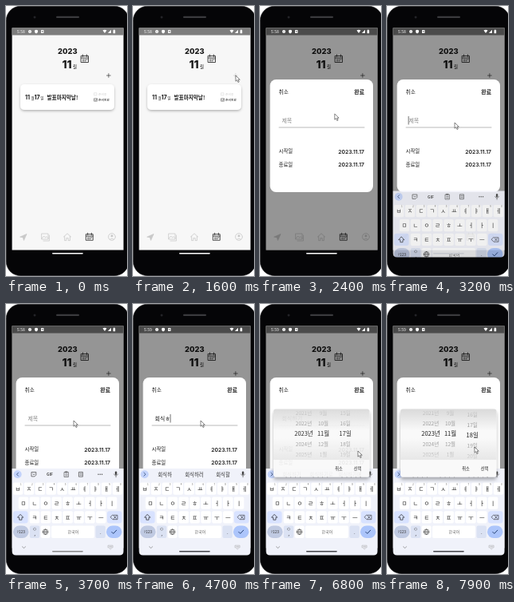
Recreate the animation shown at these times as an HTML page. Size 152 by 338 pixels, loop 8 s.

```html
<!DOCTYPE html>
<html lang="ko">
<head>
<meta charset="utf-8">
<title>Calendar app</title>
<style>
  html, body { margin: 0; width: 100%; height: 100%; overflow: hidden; background: #fff; }
  svg { display: block; width: 100vw; height: 100vh; }
  text { font-family: 'Noto Sans CJK KR', 'Noto Sans CJK', 'Noto Sans', sans-serif; white-space: pre; }
  .num { font-family: Inter, 'Noto Sans CJK KR', sans-serif; }
</style>
</head>
<body>
<svg id="stage" viewBox="0 0 152 338" xmlns="http://www.w3.org/2000/svg"></svg>
<script>
const LOOP = 8000;
const INK = '#191919';

const text = (x, y, size, str, { weight = 400, fill = INK, anchor = 'start', cls = '', id = '' } = {}) =>
  `<text x="${x}" y="${y}" font-size="${size}" font-weight="${weight}" fill="${fill}" text-anchor="${anchor}" class="${cls}" id="${id}">${str}</text>`;
const mid = (x, y, size, str, opts = {}) => text(x, y, size, str, { ...opts, anchor: 'middle' });
const rect = (x, y, w, h, r, fill, extra = '') =>
  `<rect x="${x}" y="${y}" width="${w}" height="${h}" rx="${r}" fill="${fill}" ${extra}/>`;
const line = (d, color = INK, width = .7, extra = '') =>
  `<path d="${d}" fill="none" stroke="${color}" stroke-width="${width}" stroke-linecap="round" stroke-linejoin="round" ${extra}/>`;
const circle = (x, y, r, fill) => `<circle cx="${x}" cy="${y}" r="${r}" fill="${fill}"/>`;
const group = (id, body, extra = '') => `<g id="${id}" ${extra}>${body}</g>`;

const calendar = (x, y, s, color) => group('', line(
  'M-4.5-3.5h9v8h-9zM-4.5-1h9M-2.5-5v2.4M2.5-5v2.4M-2.5 1h1M0 1h1M2.2 1h.8M-2.5 2.8h1M0 2.8h1', color, .9),
  `transform="translate(${x} ${y}) scale(${s})"`);

function phone() {
  return rect(.2, .2, 154, 337.5, 18, '#050507', 'stroke="#29292c" stroke-width=".6"') +
    rect(63, 12.8, 29, 2.2, 1.1, '#3a3a3d') + circle(36, 14, 1.5, '#232328');
}

function statusIcons() {
  return text(14, 33.9, 5, '', { fill: '#fff', id: 'clock' }) +
    circle(30, 32, 2, '#fff') + circle(30, 32, .6, '#666') +
    `<path d="M38 29.7l2 .8v1.5q0 1.6-2 2.4q-2-.8-2-2.4v-1.5z" fill="#fff"/>` +
    rect(44, 30, 3.4, 4, .5, '#fff') + rect(45, 31.2, 1.4, 1.4, 0, '#666') +
    `<path d="M121.5 30.6q2.5-1.8 5 0l-2.5 3.4zM132 29.8v4.2h-4zM134.6 30.2h.8v-.6h1v.6h.8v4h-2.6z" fill="#fff"/>`;
}

function page() {
  const soft = '#c9c9c9';
  const nav =
    line('M18 289l8-3.6-3.6 8-1-3.4z', soft, .8, 'style="fill:#c9c9c9"') +
    line('M45 285h8v7h-8zM45 291l2.6-3 2 2 1.5-1.4 2 2M47 294h7.4v-7', soft, .8) +
    line('M72.4 289l4.6-4.2 4.6 4.2M73.6 288.4v5.2h2.2v-3h2.4v3h2.2v-5.2', soft, .8) +
    calendar(105, 289, .95, '#333') +
    line('M137.4 289a4.4 4.4 0 1 0-8.8 0a4.4 4.4 0 1 0 8.8 0M130.3 292.2q2.7-2.6 5.4 0', soft, .8) + circle(133, 287.8, 1.5, soft);
  return rect(7, 27, 142, 279, 0, '#f7f7f7') + rect(7, 27, 142, 9.5, 0, '#7d7d7d') +
    mid(77.4, 60, 9.4, '2023', { weight: 800, cls: 'num' }) +
    text(70.5, 77.5, 13.8, '11', { weight: 800, cls: 'num' }) + text(84, 77.5, 5.5, '월', { weight: 500 }) +
    calendar(99, 66, 1, '#333') +
    line('M126.5 87h4.8M128.9 84.6v4.8', INK, .6, 'id="plus"') +
    rect(18, 98, 118, 32, 5, '#fff', 'filter="url(#cardShadow)"') +
    text(24, 116.6, 7, '11', { weight: 700, cls: 'num' }) + text(31.4, 117, 4.5, '월') +
    text(35.5, 116.6, 7, '17', { weight: 700, cls: 'num' }) + text(43.3, 117, 4.5, '일') +
    text(51.5, 116.6, 6.6, '발표마지막날!', { weight: 600 }) +
    line('M111 108.8h3v3h-3z', '#d2d2d2', .5) + text(116, 112, 3.8, '준비중', { fill: '#d2d2d2' }) +
    line('M111 115.8h3.4v3.4h-3.4zM111.8 117.4l.8 1 1.8-2.2', '#333', .5) + text(116, 119.2, 3.8, '준비완료') +
    nav;
}

// Sheet contents are laid out for its resting place.
function sheet() {
  const date = y => text(131, y, 6.8, '2023.11.17', { weight: 600, cls: 'num', anchor: 'end' });
  return rect(12.6, 92, 129.4, 141, 7.5, '#fff') +
    text(23.6, 110.4, 6.6, '취소') + text(131, 110.4, 6.9, '완료', { weight: 700, anchor: 'end' }) +
    text(27.4, 145.8, 7, '', { id: 'field' }) +
    rect(0, 138, .7, 10.5, 0, '#333', 'id="caret"') +
    line('M24 152h107', '#8a8a8a', .6) +
    text(23.6, 183.8, 6.4, '시작일') + date(184.6) +
    text(23.6, 200.6, 6.4, '종료일') + date(201.2);
}

function keyboard() {
  const pitch = 13.9, accent = '#d8e2ff', muted = '#dbe2f3';
  const row = (letters, left, top) => [...letters].map((c, i) =>
    rect(left + i * pitch + .7, top, pitch - 1.4, 15.2, 2, '#fff') +
    mid(left + (i + .5) * pitch, top + 10.3, 7.3, c, { fill: '#222' })).join('');
  const hints = [...'1234567890'].map((c, i) => mid(18.9 + i * pitch, 226.8, 3, c, { fill: '#666' })).join('');
  const tools = group('tools',
    line('M32.3 210.5h5.5v3.6l-1.8 1.8h-3.7zM33.8 213q1.2 1.4 2.4 0', '#444', .7) +
    mid(55, 215, 4.8, 'GIF', { weight: 700, fill: '#444' }) +
    line('M73.4 210.5h5v6h-5zM74.9 209.8h2v1.2h-2zM74.7 213h2.4M74.7 214.8h2.4', '#444', .6) +
    line('M91.8 210.4h4.6v5.8h-4.6zM93 212.2h2.2M93 214.2h2.2', '#444', .7) +
    [116, 118.3, 120.6].map(x => circle(x, 213.2, .7, '#444')).join(''));
  const words = group('words', [40, 77, 113].map((x, i) =>
    mid(x, 215.5, 6.4, '', { fill: '#333', id: 'word' + i })).join(''));
  return rect(7, 206, 142, 140, 0, '#f0f2fa') +
    circle(14.6, 213.2, 5, '#c3d3fb') + line('', '#26406f', .8, 'id="chevron"') + tools + words +
    rect(136.9, 209.4, 2.4, 4.6, 1.2, '#444') + line('M135.6 213q2.5 4.2 5 0M138.1 215.2v1.6', '#444', .6) +
    row('ㅂㅈㄷㄱㅅㅛㅕㅑㅐㅔ', 8, 223.5) + hints +
    row('ㅁㄴㅇㄹㅎㅗㅓㅏㅣ', 15, 241.5) +
    row('ㅋㅌㅊㅍㅠㅜㅡ', 29, 259.3) +
    rect(9, 259.3, 18.5, 15.2, 3, accent) + line('M18.3 263.6l3.4 3.6h-1.8v3h-3.2v-3h-1.8z', '#222', .7) +
    rect(127, 259.3, 18.5, 15.2, 3, accent) + line('M134 264.3h6v5.4h-6l-2.6-2.7zM135.6 265.6l2.6 2.8M138.2 265.6l-2.6 2.8', '#222', .6) +
    rect(9, 277.5, 19.5, 15.6, 7.8, '#c0cae2') + mid(18.7, 287, 4.8, '?123', { fill: '#333' }) +
    rect(29.8, 277.5, 12.4, 15.6, 2, muted) + mid(36, 289.5, 6, ',') + line('M34.4 281.8a1.6 1.6 0 1 0 3.2 0a1.6 1.6 0 1 0-3.2 0', '#555', .4) +
    rect(43.6, 277.5, 12, 15.6, 2, '#fff') +
    line('M46.2 285.3a3.3 3.3 0 1 0 6.6 0a3.3 3.3 0 1 0-6.6 0M46.2 285.3h6.6M49.5 282q-3 3.3 0 6.6q3-3.3 0-6.6', '#333', .6) +
    rect(57, 277.5, 54, 15.6, 2, '#fff') + mid(84.5, 287, 5, '한국어', { fill: '#666' }) +
    rect(112.5, 277.5, 12.4, 15.6, 2, muted) + mid(118.9, 287.5, 6, '.') +
    rect(126, 277.5, 19.5, 15.6, 7.8, '#acc5fb') + line('M132.8 285.4l2 2 4-4.2', '#1c3768', .9) +
    line('M20.5 303.8l2 1.8 2-1.8', '#666', .6) +
    line('M128.5 302.2h5.6v2.8h-5.6zM129.8 303.6h3M130.3 306.3l1 .8 1-.8', '#999', .45);
}

function picker() {
  const item = (x, step, label) => mid(x, 165.4 + step * 13, step ? 6.5 : 7.5, label,
    { fill: step ? '#888' : INK, weight: step ? 400 : 500 });
  const steps = [-2, -1, 0, 1, 2];
  return rect(17, 131.5, 120.5, 85, 3, '#f9f9f9', 'filter="url(#dialogShadow)"') +
    group('', steps.map(s => item(55, s, `${2023 + s}년`) + item(79.5, s, `${(10 + s) % 12 + 1}월`)).join('') +
      group('days', ''), 'clip-path="url(#wheel)"') +
    rect(17, 131.5, 120.5, 27, 3, 'url(#fadeTop)') + rect(17, 168, 120.5, 27, 0, 'url(#fadeBottom)') +
    text(94.3, 208, 5.2, '취소', { weight: 500 }) + text(117.8, 208, 5.2, '선택', { weight: 500 });
}

const shadow = (id, dy, blur, alpha) =>
  `<filter id="${id}" x="-20%" y="-20%" width="140%" height="150%"><feDropShadow dx="0" dy="${dy}" stdDeviation="${blur}" flood-color="#000" flood-opacity="${alpha}"/></filter>`;
const fade = (id, color, from, to) => `<linearGradient id="${id}" x2="0" y2="1">` +
  `<stop stop-color="${color}" stop-opacity="${from}"/><stop offset="1" stop-color="${color}" stop-opacity="${to}"/></linearGradient>`;

const stage = document.getElementById('stage');
stage.innerHTML = `<defs>
  <clipPath id="screen"><rect x="7.6" y="27.6" width="140" height="278"/></clipPath>
  <clipPath id="glass"><path d="M7.6 27.6h140v282q0 5-5 5h-130q-5 0-5-5z"/></clipPath>
  <clipPath id="wheel"><rect x="17" y="132" width="121" height="63"/></clipPath>
  ${shadow('cardShadow', 1.5, 1.4, .28)}${shadow('dialogShadow', 3.5, 2.2, .3)}
  ${fade('fadeTop', '#d6d6d6', .9, 0)}${fade('fadeBottom', '#e4e4e4', 0, .85)}
  </defs>` + phone() +
  group('', page() + rect(7, 27, 142, 279, 0, '#000', 'id="scrim"') + statusIcons() + group('sheet', sheet()), 'clip-path="url(#screen)"') +
  group('', group('keyboard', keyboard()) + group('picker', picker()), 'clip-path="url(#glass)"') +
  rect(58, 309.1, 38.8, 1.5, .75, '#fff', 'id="pill"') +
  group('', `<path id="mouse" d="M0 0v7.2l1.7-1.5 1.3 2.8 1.3-.6-1.3-2.7h2.3z" fill="#fff" stroke="#333" stroke-width=".6"/>`, 'clip-path="url(#glass)"');

const el = {};
stage.querySelectorAll('[id]').forEach(node => { if (node.id) el[node.id] = node; });

// Linear interpolation through [time, ...values] points.
function track(points, t) {
  if (t <= points[0][0]) return points[0].slice(1);
  for (let i = 1; i < points.length; i++) {
    const a = points[i - 1], b = points[i];
    if (t <= b[0]) {
      const k = (t - a[0]) / (b[0] - a[0]);
      return a.slice(1).map((v, j) => v + (b[j + 1] - v) * k);
    }
  }
  return points[points.length - 1].slice(1);
}

const mousePath = [[300, 144, 89], [900, 130, 87], [1200, 129, 87], [2000, 129, 87], [2500, 85, 147], [2700, 85, 146],
  [5600, 85, 146], [6300, 123, 176], [6500, 125, 176], [6700, 125, 176], [6800, 123, 184], [7500, 111, 182], [7900, 110, 179]];
const sheetPath = [[1600, 305], [1700, 235], [1800, 147], [1900, 92]];
// Offset and opacity while the keyboard slides in.
const keyboardPath = [[3200, 25.5, .86], [3300, 9, .95], [3400, 2.5, 1], [3500, 0, 1]];
const dayPath = [[7500, 0], [7600, .15], [7700, .4], [7800, .65], [7900, .85]];
const typing = [
  [3900, 'ㅎ', '하 한 해'], [4000, '호', '호 혹시 호텔'], [4200, '회', '회사 회의 회식'],
  [4300, '횟', '횟수 횟집 횟감'], [4400, '회시', '회시 회식 회신'], [4500, '회식', '회식 회식은 회식이'],
  [4700, '회식ㅎ', '회식하 회식하러 회식할'], [4800, '회식하', '회식하 회식하고 회식할'],
  [5000, '회식하기', '회식하기 회식하기로 회식하기에']];

const show = (node, on) => node.setAttribute('display', on ? 'inline' : 'none');
const shift = (node, x, y) => node.setAttribute('transform', `translate(${x} ${y})`);

function drawDays(scroll) {
  el.days.innerHTML = [-2, -1, 0, 1, 2, 3].map(n => {
    const step = n - scroll, near = Math.abs(step) < .5;
    return mid(107.2, 165.4 + step * 13, near ? 7.5 : 6.5, `${17 + n}일`,
      { fill: near ? INK : '#888', weight: near ? 500 : 400 });
  }).join('');
}

function render(time) {
  const t = Math.floor(time / 100) * 100;
  const typed = typing.filter(([start]) => start <= t).pop();

  el.clock.textContent = t < 4300 ? '5:58' : '5:59';
  el.plus.setAttribute('opacity', t >= 1400 && t < 1700 ? .25 : 1);
  el.scrim.setAttribute('opacity', t < 1700 ? 0 : t < 1800 ? .25 : .4);

  show(el.sheet, t >= 1700);
  shift(el.sheet, 0, track(sheetPath, t)[0] - 92);
  el.field.textContent = typed ? typed[1] : '제목';
  el.field.setAttribute('fill', typed ? INK : '#8a8a8a');
  el.caret.setAttribute('x', 26.7 + (typed ? typed[1].length * 6.45 + .6 : 0));
  const blinkStart = t < 3900 ? 2900 : 5000;
  show(el.caret, t >= 2900 && (t >= 3900 && t < 5000 || Math.floor((t - blinkStart) / 500) % 2 === 0));

  const [drop, alpha] = track(keyboardPath, t);
  show(el.keyboard, t >= 3200);
  shift(el.keyboard, 0, drop);
  el.keyboard.setAttribute('opacity', alpha);
  show(el.tools, !typed);
  show(el.words, !!typed);
  el.chevron.setAttribute('d', typed ? 'M13.8 211.2l2 2-2 2' : 'M15.5 211.2l-2 2 2 2');
  if (typed) typed[2].split(' ').forEach((word, i) => { el['word' + i].textContent = word; });
  el.pill.setAttribute('fill', t < 3200 ? '#fff' : t < 3700 ? '#c4c6cc' : t < 3900 ? '#888' : '#45454a');

  show(el.picker, t >= 6700);
  el.picker.setAttribute('opacity', t < 6800 ? .5 : t < 6900 ? .93 : 1);
  drawDays(track(dayPath, t)[0]);

  show(el.mouse, t >= 300);
  shift(el.mouse, ...track(mousePath, t));
}

const start = performance.now();
(function tick() {
  render((performance.now() - start) % LOOP);
  requestAnimationFrame(tick);
})();
</script>
</body>
</html>
```
